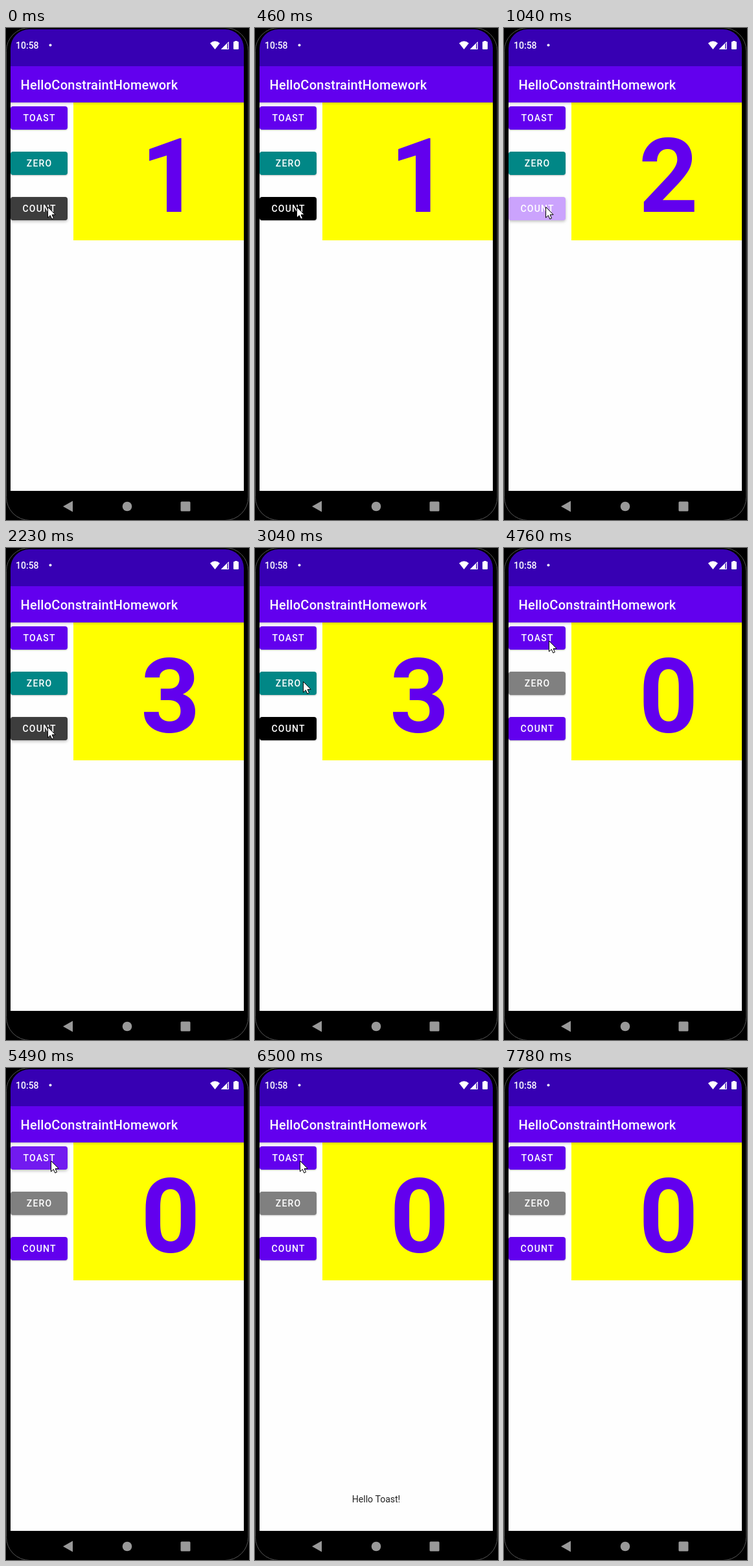
An HTML page with a canvas that plays this animation: 375 by 760 pixels, repeating every 8.06 s.

```html
<!DOCTYPE html>
<html lang="en">
<head>
<meta charset="utf-8">
<title>HelloConstraintHomework</title>
<style>
html, body { margin: 0; width: 100%; height: 100%; overflow: hidden; background: #000; }
canvas { display: block; width: 375px; height: 760px; }
</style>
</head>
<body>
<canvas id="stage"></canvas>
<script>
const W = 375, H = 760, LOOP = 8060, TICK = 140;
const PURPLE = '#6200ee', LILAC = '#bb86fc', TEAL = '#018786', GRAY = '#808080';
const canvas = document.getElementById('stage');
const ctx = canvas.getContext('2d');
const dpr = window.devicePixelRatio || 1;
canvas.width = W * dpr;
canvas.height = H * dpr;

// A tap acts on release; its ripple lasts from press to end.
const tap = (key, press, release, end) => ({ key, press, release, end });
const taps = [
  tap('COUNT', -TICK, 0, 460),
  tap('COUNT', 890, 1030, 1170),
  tap('COUNT', 1920, 2200, 2360),
  tap('ZERO', 3750, 3890, 4050),
  tap('TOAST', 5200, 5480, 5640)
];
const glides = [
  { start: 2760, to: [74.5, 206] },
  { start: 4480, to: [69.5, 143] }
];
const HOME = [64.5, 276], EXIT = [177.5, 486], EXIT_TIME = 6800;

// Progress from 0 to 1 in n even jumps, the first one at start.
function stepped(t, start, n) {
  const jumps = Math.floor((t - start) / TICK) + 1;
  return Math.min(1, Math.max(0, jumps / n));
}

function countAt(t) {
  return taps.filter(p => t >= p.release)
    .reduce((n, p) => p.key === 'COUNT' ? n + 1 : p.key === 'ZERO' ? 0 : n, 0);
}

const pressed = (key, t) => taps.some(p => p.key === key && t >= p.press && t < p.end);

function cursorAt(t) {
  if (t >= EXIT_TIME) return t < EXIT_TIME + 150 ? EXIT : null;
  return glides.reduce(([x, y], { start, to }) => {
    const k = stepped(t, start, 3);
    return [x + (to[0] - x) * k, y + (to[1] - y) * k];
  }, HOME);
}

function rect(x, y, w, h, fill) {
  ctx.fillStyle = fill;
  ctx.fillRect(x, y, w, h);
}

function round(x, y, w, h, r, fill) {
  ctx.beginPath();
  ctx.roundRect(x, y, w, h, r);
  ctx.fillStyle = fill;
  ctx.fill();
}

function poly(points, fill) {
  ctx.beginPath();
  points.forEach(([x, y]) => ctx.lineTo(x, y));
  ctx.closePath();
  ctx.fillStyle = fill;
  ctx.fill();
}

function disc(x, y, r, fill) {
  ctx.beginPath();
  ctx.arc(x, y, r, 0, Math.PI * 2);
  ctx.fillStyle = fill;
  ctx.fill();
}

function text(str, x, y, font, fill, align = 'left', spacing = 0) {
  ctx.font = font + ' Roboto, sans-serif';
  ctx.textAlign = align;
  ctx.letterSpacing = spacing + 'px';
  ctx.fillStyle = fill;
  ctx.fillText(str, x, y);
}

function drawBody() {
  rect(0, 0, W, H, '#000');
  ctx.beginPath();
  ctx.roundRect(.5, -.5, 373.5, 761, 36);
  ctx.strokeStyle = '#555';
  ctx.lineWidth = 1;
  ctx.stroke();
  ctx.save();
  ctx.beginPath();
  ctx.roundRect(7, 2, 360, 755, 29);
  ctx.clip();
  rect(7, 2, 360, 57, '#3700b3');
  rect(7, 59, 360, 56, PURPLE);
  rect(7, 115, 360, 600, '#fefefe');
  rect(7, 715, 360, 45, '#000');
  ctx.restore();
}

function drawStatus() {
  text('10:58', 15, 32, '500 14px', '#fff');
  disc(68.5, 26.5, 2, '#fff');
  ctx.beginPath();
  ctx.moveTo(322.5, 33);
  ctx.lineTo(315, 23.5);
  ctx.quadraticCurveTo(322.5, 17, 330, 23.5);
  ctx.closePath();
  ctx.fillStyle = '#fff';
  ctx.fill();
  poly([[332.7, 32.5], [343.5, 21.7], [343.5, 32.5]], 'rgba(255,255,255,.3)');
  ctx.strokeStyle = '#fff';
  ctx.stroke();
  poly([[332, 33], [341, 24], [341, 33]], '#fff');
  rect(353, 20, 4, 2, '#fff');
  round(351, 21, 8, 12, 1, '#fff');
}

function drawNav() {
  const fill = '#999';
  poly([[88, 739], [103, 730.5], [103, 747.5]], fill);
  disc(187, 739, 7.3, fill);
  round(269.5, 731.5, 15, 15, 1.5, fill);
}

function drawButton(label, y, color, t, glow = .24) {
  const down = pressed(label, t);
  ctx.save();
  ctx.shadowColor = 'rgba(0,0,0,.25)';
  ctx.shadowBlur = (down ? 4 : 2) * dpr;
  ctx.shadowOffsetY = (down ? 2 : 1) * dpr;
  round(7, y, 88, 36, 4, color);
  ctx.restore();
  if (down) round(7, y, 88, 36, 4, `rgba(255,255,255,${glow})`);
  text(label, 51.6, y + 23, '500 14px', '#fff', 'center', 1.25);
}

function drawCounter(count) {
  rect(104, 115, 263, 213, '#ff0');
  const shade = ctx.createLinearGradient(0, 115, 0, 119);
  shade.addColorStop(0, 'rgba(0,0,0,.18)');
  shade.addColorStop(1, 'rgba(0,0,0,0)');
  rect(7, 115, 360, 4, shade);
  text(count, 254, 284, 'bold 160px', PURPLE, 'center');
}

function drawMessage(t) {
  const alpha = stepped(t, 6070, 4) - stepped(t, 7500, 3);
  text('Hello Toast!', 187, 671, '14px', `rgba(0,0,0,${alpha * .87})`, 'center');
}

function drawCursor([x, y]) {
  ctx.save();
  ctx.translate(x, y + .5);
  poly([[0, 0], [0, 16.5], [3.8, 13], [6.3, 18.6], [9, 17.4], [6.6, 12], [11.6, 11.8]], '#fff');
  ctx.strokeStyle = '#000';
  ctx.stroke();
  ctx.restore();
}

function draw(t) {
  ctx.setTransform(dpr, 0, 0, dpr, 0, 0);
  const count = countAt(t);
  const tint = count === 0 ? PURPLE : count % 2 ? '#000' : LILAC;
  drawBody();
  drawStatus();
  text('HelloConstraintHomework', 22.5, 95, '500 20px', '#fff', 'left', .25);
  drawCounter(count);
  drawButton('TOAST', 121, PURPLE, t, .1);
  drawButton('ZERO', 191, count ? TEAL : GRAY, t);
  drawButton('COUNT', 261, tint, t);
  drawMessage(t);
  drawNav();
  const cursor = cursorAt(t);
  if (cursor) drawCursor(cursor);
}

const begin = performance.now();
function tick() {
  draw((performance.now() - begin) % LOOP);
  requestAnimationFrame(tick);
}
tick();
</script>
</body>
</html>
```
